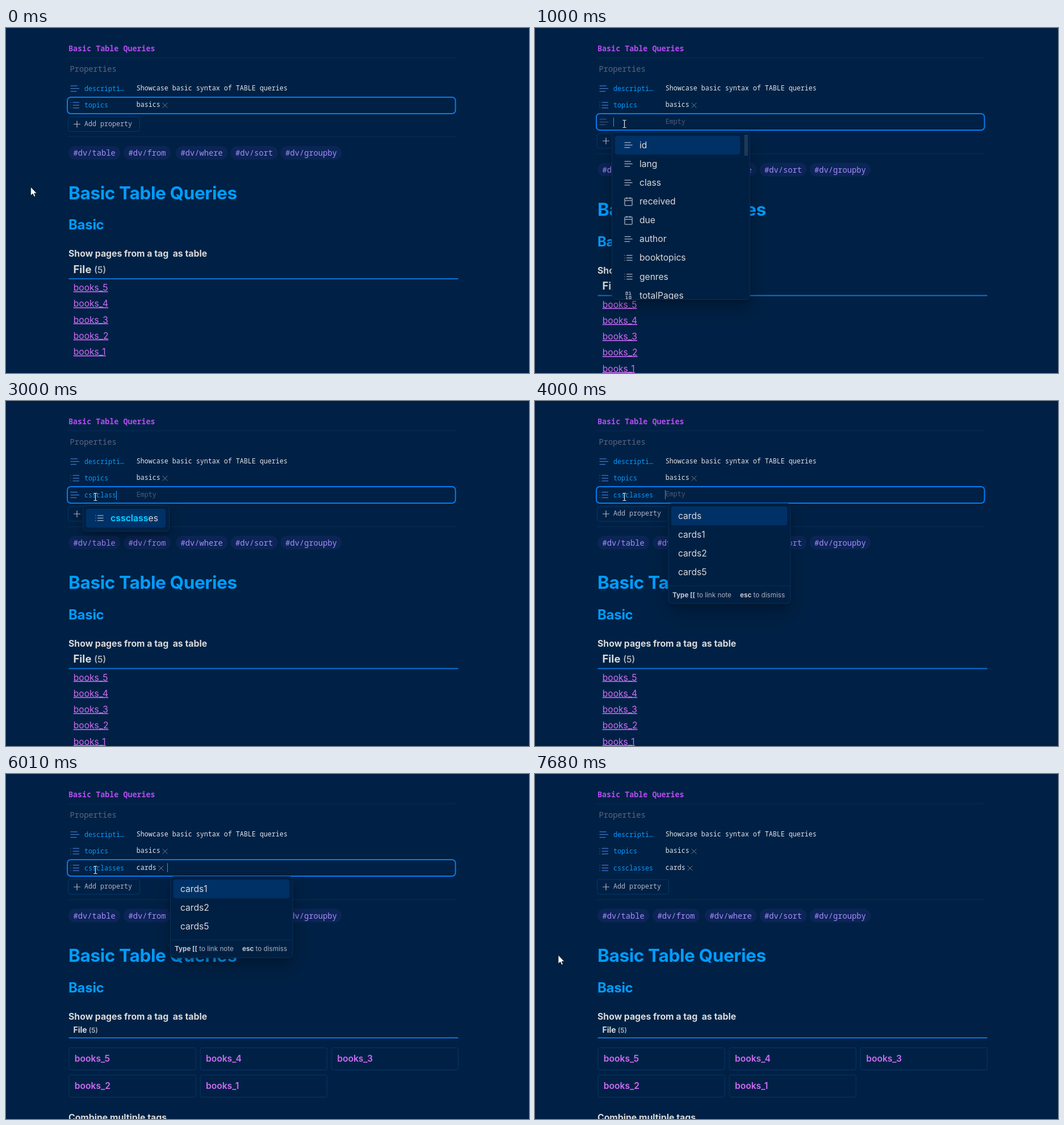
Recreate the animation shown at these times as an HTML page. Size 921 by 608 pixels, loop 8 s.

```html
<!DOCTYPE html>
<html lang="en">
<head>
<meta charset="utf-8">
<title>Basic Table Queries</title>
<style>
  html, body { margin: 0; width: 100%; height: 100%; overflow: hidden; background: #002145; }
  svg { display: block; width: 100%; height: 100%; }
  text { font-family: Inter, sans-serif; font-size: 15.6px; fill: #dadada; font-optical-sizing: none; white-space: pre; }
  .mono { font-family: "Noto Sans Mono", "DejaVu Sans Mono", monospace; font-size: 11.68px; }
  .value { fill: #e4e4e8; }
  .key { fill: #069aff; }
  .muted { fill: #4f5a76; }
  .button { fill: #b0b6c8; }
  .title { font-size: 13.4px; font-weight: 700; fill: #b24cf0; }
  .caption { font-size: 13.7px; fill: #5a6680; }
  .tag { font-size: 13.75px; fill: #a58cfa; }
  .h1 { font-size: 31.6px; font-weight: 700; letter-spacing: -.013em; fill: #009dff; }
  .h2 { font-size: 24px; font-weight: 700; letter-spacing: -.012em; fill: #009dff; }
  .h3 { font-size: 15.8px; font-weight: 700; }
  .head { font-size: 18.5px; font-weight: 700; }
  .head.small { font-size: 14px; }
  .count { font-size: 15.4px; font-weight: 600; fill: #b0b3ba; }
  .count.small { font-size: 11.8px; }
  .link { fill: #cf6cf8; text-decoration: underline; }
  .cardlink { font-weight: 600; fill: #cf6cf8; }
  .match { font-weight: 700; fill: #00cbff; }
  .hint { font-size: 11.67px; fill: #aab0bc; }
  .hint .b { font-weight: 700; fill: #c4c8d0; }
  .icon { fill: none; stroke-linecap: round; stroke-linejoin: round; }
  .rule { fill: #0a2c54; shape-rendering: crispEdges; }
  .accent { fill: #0a72d6; }
  .ring { fill: none; stroke: #067cf0; stroke-width: 2; }
  .popup { fill: #002043; stroke: #0b2f5a; filter: drop-shadow(0 3px 3px rgba(0,0,0,.18)) drop-shadow(0 15px 15px rgba(0,0,0,.24)); }
  .active { fill: #003166; }
  .thumb { fill: #1b3959; }
  .pill { fill: #0b2556; }
  .box { fill: none; stroke: #07366c; }
  .hover { fill: #062b56; }
  .caret { fill: #1a9dff; }
  .arrow { fill: #fff; stroke: #111; stroke-width: .7; }
  .beam { fill: none; stroke: #e8e8e8; stroke-width: 1.2; }
</style>
</head>
<body>
<svg id="stage" viewBox="0 0 921 608"></svg>
<script>
const LOOP = 8000, SHIFT = 29.5, PITCH = 33.13;
const changes = [0, 330, 660, 1000, 1330, 1680, 2010, 2340, 2670, 3000, 3340, 4000,
  4330, 4660, 4990, 5320, 5680, 6010, 6680, 7020, 7350, 7680];
const keySteps = [[1680, 1], [2010, 3], [2340, 4], [2670, 6], [3000, 8], [3340, 10]];
const valueSteps = [[4660, 1], [4990, 3], [5320, 5]];

const iconPaths = {
  text: 'M17 6H3M21 12H3M15 18H3',
  list: 'M8 6h13M8 12h13M8 18h13M3 6h.01M3 12h.01M3 18h.01',
  date: 'M5 4h14a2 2 0 0 1 2 2v14a2 2 0 0 1-2 2H5a2 2 0 0 1-2-2V6a2 2 0 0 1 2-2zM16 2v4M8 2v4M3 10h18',
  number: 'M14 14h4v6h-4zM6 4h4v6H6zM6 20h4M14 10h4M6 14h2v6M14 4h2v6'
};
const allKeys = [['id', 'text'], ['lang', 'text'], ['class', 'text'], ['received', 'date'], ['due', 'date'],
  ['author', 'text'], ['booktopics', 'list'], ['genres', 'list'], ['totalPages', 'number']];
const keysWithC = [['class', 'text'], ['cssclasses', 'list'], ['cover', 'text'], ['created', 'date'],
  ['category', 'text'], ['contacts', 'list'], ['received', 'date'], ['booktopics', 'list'], ['recipes', 'list']];

const between = (t, a, b) => t >= a && t < b;
const typed = (steps, t) => steps.reduce((n, [at, len]) => t >= at ? len : n, 0);
const text = (x, y, cls, s) => `<text x="${x}" y="${y}" class="${cls}">${s}</text>`;
const mono = (x, y, cls, s) => text(x, y, 'mono ' + cls, s);
const rect = (x, y, w, h, cls, r = 0) => `<rect x="${x}" y="${y}" width="${w}" height="${h}" rx="${r}" class="${cls}"/>`;
const group = (dy, s) => `<g transform="translate(0 ${dy})">${s}</g>`;
const icon = (name, x, cy, scale, color) =>
  `<path class="icon" transform="translate(${x} ${cy - 12 * scale}) scale(${scale})" d="${iconPaths[name]}" stroke="${color}" stroke-width="${1.25 / scale}"/>`;
const cross = (x, y) => `<path class="icon" d="M${x - 4} ${y - 4}l8 8m0-8l-8 8" stroke="#74798c"/>`;
const marked = (s, n) => n ? `<tspan class="match">${s.slice(0, n)}</tspan>${s.slice(n)}` : s;
const markedAt = (s, c) => s.replace(c, `<tspan class="match">${c}</tspan>`);
const caret = (x, y) => rect(x, y, 1, 16, 'caret');

function property(cy, name, type, color = '#3f78cc') {
  return icon(type, 111.6, cy, .81, color) + mono(138, cy + 4, 'key', name);
}

function addButton(hover) {
  return rect(109.5, 156.5, 126, 26, hover ? 'box hover' : 'box', 4) +
    '<path class="icon" d="M119.5 169.5h11m-5.5-5.5v11" stroke="#b0b6c8" stroke-width="1.2"/>' +
    mono(138, 172.5, 'button', 'Add property');
}

function tags() {
  return [[110, 'table'], [207, 'from'], [299, 'where'], [395.5, 'sort'], [483.5, 'groupby']].map(([x, s]) =>
    rect(x, 208, (s.length + 4) * 8.25 + 17, 24, 'pill', 12) + mono(x + 8.6, 225.3, 'tag', '#dv/' + s)).join('');
}

function heading() {
  return rect(108, 191, 684, 1, 'rule') + tags() +
    text(110, 301.5, 'h1', 'Basic Table Queries') + text(110, 355, 'h2', 'Basic') +
    text(110, 403, 'h3', 'Show pages from a tag&#160; as table');
}

function table() {
  let s = text(118.5, 431.5, 'head', 'File') + text(155.3, 431.5, 'count', '(5)') + rect(110.5, 441, 686, 2, 'accent');
  for (let i = 0; i < 5; i++) s += text(118.8, 463 + i * 28.25, 'link', 'books_' + (5 - i));
  return s;
}

function cards() {
  let s = text(118.5, 456, 'head small', 'File') + text(145.8, 456, 'count small', '(5)') + rect(110.5, 464, 686, 2, 'accent');
  for (let i = 0; i < 5; i++) {
    const x = 111 + i % 3 * 231.2, y = 482.5 + (i > 2) * 48;
    s += rect(x, y, 223, 39, 'box', 3) + text(x + 9.8, y + 24.7, 'cardlink', 'books_' + (5 - i));
  }
  return s + text(110, 610.5, 'h3', 'Combine multiple tags');
}

function keyMenu(items, right, mark, long) {
  const bottom = long ? 479 : 230;
  let s = rect(135.5, 183.5, right - 136, bottom - 184, 'popup', 6) +
    rect(141, 190, right - (long ? 18 : 7) - 141, 33, 'active', 4);
  if (long) s += rect(right - 10.5, 188, 6.5, 37, 'thumb');
  const rows = items.map(([name, type], i) => {
    const cy = 206.3 + i * PITCH;
    return icon(type, 155.8, cy, .73, '#aab2c0') + text(184, cy + 5.4, '', mark(name));
  }).join('');
  return s + `<clipPath id="menu">${rect(136, 184, right - 137, bottom - 185, '')}</clipPath><g clip-path="url(#menu)">${rows}</g>`;
}

function valueMenu(x, items, n) {
  const foot = 192.5 + items.length * PITCH;
  return rect(x + .5, 180.5, 215.5, foot - 148.5, 'popup', 6) + rect(x + 1, foot, 215, 1, 'rule') +
    rect(x + 6, 186, 204, 33, 'active', 4) +
    items.map((s, i) => text(x + 18, 208 + i * PITCH, '', marked(s, n))).join('') +
    text(x + 8, foot + 20.5, 'hint', '<tspan class="b">Type [[</tspan> to link note') +
    text(x + 127, foot + 20.5, 'hint', '<tspan class="b">esc</tspan> to dismiss');
}

function newRow(t) {
  const name = 'cssclasses'.slice(0, typed(keySteps, t)), value = 'cards'.slice(0, typed(valueSteps, t));
  const done = t >= 6010, picked = t >= 4000;
  const y = picked && !done ? 167.7 : 168.7;
  return property(165.5, name, picked ? 'list' : 'text', name ? '#3f78cc' : '#35557f') +
    mono(229.7, y, value ? 'value' : 'muted', value || 'Empty') + (done ? cross(273, 166) : '');
}

function popups(t) {
  const keyLen = typed(keySteps, t), valueLen = typed(valueSteps, t);
  if (between(t, 1000, 1680)) return keyMenu(allKeys, 379, s => s, true);
  if (between(t, 1680, 2010)) return keyMenu(keysWithC, 332, s => markedAt(s, 'c'), true);
  if (between(t, 2010, 4000)) return keyMenu([['cssclasses', 'list']], 285 + (keyLen - 3) * .6, s => marked(s, keyLen), false);
  if (between(t, 4000, 6010)) return valueMenu(234, ['cards', 'cards1', 'cards2', 'cards5'], valueLen);
  if (between(t, 6010, 7680)) return valueMenu(289, ['cards1', 'cards2', 'cards5'], 0);
  return '';
}

function carets(t) {
  if (between(t, 1000, 4000) && !between(t, 1330, 1680)) return caret(138 + typed(keySteps, t) * 7, 158);
  if (between(t, 4000, 5680) && !between(t, 4330, 4660)) return caret(229 + Math.round(typed(valueSteps, t) * 6.9), 157);
  if (between(t, 6010, 7680) && !between(t, 6680, 7020)) return caret(284, 157);
  return '';
}

function pointer(t) {
  const at = (x, y, cls, d) => `<path class="${cls}" transform="translate(${x} ${y})" d="${d}"/>`;
  const arrow = 'M0 0V15L3.5 11.8L6 17L8.3 16L6 11H10.6Z';
  const hand = 'M0 1.5Q1.5-1 3 1.5V8L10 10Q12 11 11.5 14L10 20H2L-4 12Q-4 9 0 12Z';
  if (t < 330) return at(43.6, 280.3, 'arrow', arrow);
  if (t < 1000) return at(t < 660 ? 153 : 156, t < 660 ? 167 : 170, 'arrow', hand);
  if (t < 7020) return at(157.5, 169, 'beam', 'M-3-6.5H-1L0-6L1-6.5H3M0-6V6M-3 6.5H-1L0 6L1 6.5H3');
  if (t < 7350) return '';
  return t < 7680 ? at(35.6, 314.5, 'arrow', arrow) : at(41, 319.3, 'arrow', arrow);
}

function scene(t) {
  const added = t >= 1000, dy = added ? SHIFT : 0, asCards = t >= 6010;
  const ringY = t < 660 ? 122 : between(t, 1000, 7680) ? 151 : 0;
  return mono(110, 41, 'title', 'Basic Table Queries') + rect(108, 52, 684, 1, 'rule') +
    mono(112.5, 77, 'caption', 'Properties') +
    property(106.7, 'descripti…', 'text') + mono(229.7, 109.7, 'value', 'Showcase basic syntax of TABLE queries') +
    property(136, 'topics', 'list') + mono(229.7, 139.3, 'value', 'basics') + cross(280, 136.3) +
    (added ? newRow(t) : '') +
    group(dy, addButton(between(t, 330, 1000)) + heading() + (asCards ? '' : table())) +
    (asCards ? cards() : '') +
    (ringY ? rect(108, ringY, 683.5, 29, 'ring', 6) : '') +
    popups(t) + carets(t) + pointer(t);
}

const stage = document.getElementById('stage');
let shown = -1;
function frame() {
  const now = performance.now() % LOOP;
  const start = changes.filter(c => c <= now).pop();
  if (start !== shown) stage.innerHTML = scene(shown = start);
  requestAnimationFrame(frame);
}
frame();
</script>
</body>
</html>
```
